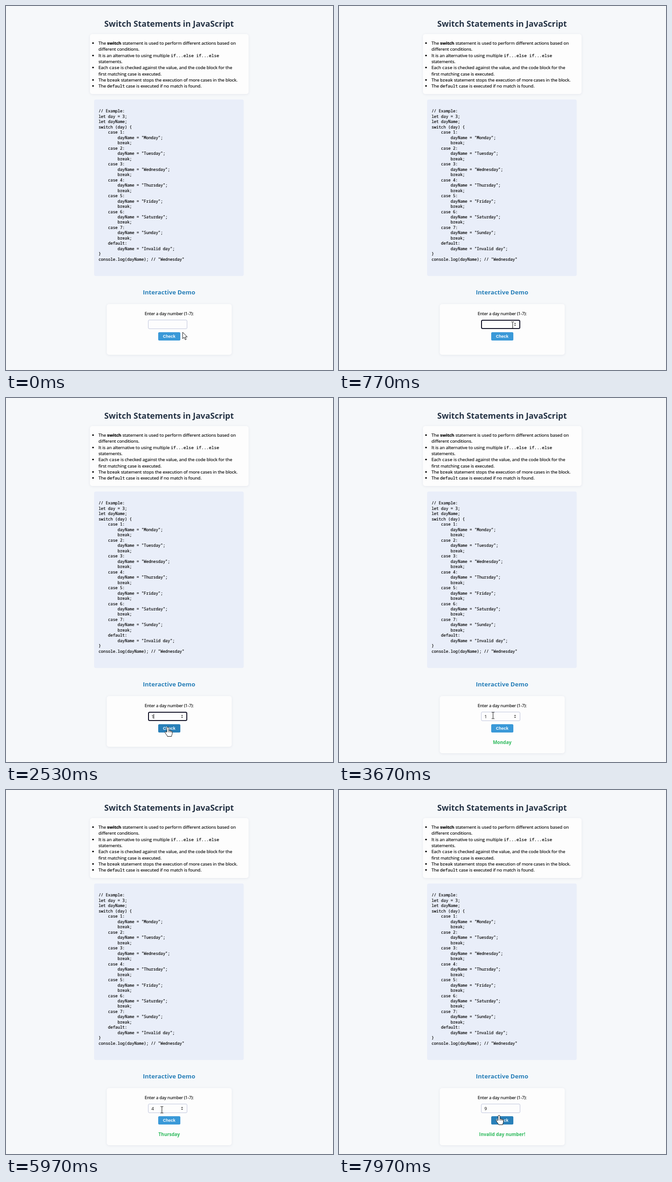
These frames come from a looping animation (709x790 px, 8000 ms). An HTML page:

```html
<!DOCTYPE html>
<html lang="en">
<head>
<meta charset="utf-8">
<title>Switch statements</title>
<style>
  html, body { margin: 0; width: 100%; height: 100%; overflow: hidden; background: #f6f8fa; }
  svg { display: block; width: 709px; height: 790px; }
  text { font-family: "Open Sans", "Noto Sans", sans-serif; white-space: pre; fill: #000; }
  .mid { text-anchor: middle; }
  .bold { font-weight: 700; }
  .mono { font-family: "Noto Sans Mono", "DejaVu Sans Mono", monospace; }
  .ui { font-family: "Liberation Sans", Arial, sans-serif; }
  #list text, #code text, #label { stroke: #000; stroke-width: .18px; }
  #list text { font-size: 9.45px; }
  #list .mono { font-size: 9.2px; }
  #code text { font-size: 8.62px; }
  .card { fill: #fdfdfd; filter: drop-shadow(0 1px 2.5px rgba(40, 60, 100, .09)); }
</style>
</head>
<body>
<svg viewBox="0 0 709 790">
  <text class="mid bold" x="353.5" y="45" style="font-size:17.75px;fill:#253345">Switch Statements in JavaScript</text>
  <rect class="card" x="182" y="61" width="344" height="130" rx="5"/>
  <g id="list"></g>

  <rect x="191" y="203" width="324.5" height="383" rx="4" fill="#e9eef9"/>
  <g id="code"></g>

  <text class="mid bold" x="353.5" y="626" style="font-size:13.15px;fill:#2980b9">Interactive Demo</text>
  <rect id="panel" class="card" x="218.5" y="647" width="271" height="110" rx="5"/>
  <text id="label" class="mid" x="353.8" y="671" style="font-size:8.97px">Enter a day number (1-7):</text>

  <rect id="field" fill="#fdfdfd"/>
  <text id="value" x="315.2" y="694.6" style="font-size:9.6px"></text>
  <path id="caret" stroke="#000" d="M0 686v10"/>
  <path id="spinner" fill="#444" d="M379.5 690l2.2-2.6 2.2 2.6zM379.5 692l2.2 2.6 2.2-2.6z"/>

  <rect id="button" x="330" y="708" width="48" height="18" rx="2.5"/>
  <text class="ui mid bold" x="353.7" y="720" style="font-size:9px;fill:#fff">Check</text>
  <text id="result" class="mid bold" x="353.8" y="751" style="font-size:10px;fill:#2dba5c"></text>

  <g id="pointer" stroke-linejoin="round">
    <path id="arrow" fill="#fff" stroke="#111" d="M0 0V14l3.2-3 2.4 5.4 2.2-1-2.3-5.2H10Z"/>
    <path id="beam" fill="none" stroke="#111" d="M-3-7h2.2l.8.6.8-.6H3M0-6.4V6.4M-3 7h2.2l.8-.6.8.6H3"/>
    <g id="hand" fill="#fff" stroke="#111">
      <path d="M-2 9V0a2 2 0 0 1 4 0v6a1.6 1.6 0 0 1 3 .5 1.5 1.5 0 0 1 2.5.7 1.3 1.3 0 0 1 2 1.2v4c0 2-1.5 3-1.5 6H-1c0-2-3-4-5-8.5-.8-2 1.5-2.5 2.5-1Z"/>
      <path d="M2 6v3.5M5 6.5v3M7.5 7.5v2"/>
    </g>
  </g>
</svg>
<script>
const $ = id => document.getElementById(id);
const mono = s => `<tspan class="mono">${s}</tspan>`;

// A leading "*" marks a line that starts a bullet.
$('list').innerHTML = [
  '*The <tspan class="bold">switch</tspan> statement is used to perform different actions based on',
  'different conditions.',
  `*It is an alternative to using multiple ${mono('if...else if...else')}`,
  'statements.',
  `*Each ${mono('case')} is checked against the value, and the code block for the`,
  'first matching case is executed.',
  `*The ${mono('break')} statement stops the execution of more cases in the block.`,
  `*The ${mono('default')} case is executed if no match is found.`
].map((line, i) => {
  const y = 84 + Math.round(i * 13.3);
  const dot = line[0] === '*' ? `<circle cx="188.7" cy="${y - 3.5}" r="1.8"/>` : '';
  return `${dot}<text x="200.5" y="${y}">${line.replace('*', '')}</text>`;
}).join('');

const days = ['Monday', 'Tuesday', 'Wednesday', 'Thursday', 'Friday', 'Saturday', 'Sunday'];
const assign = name => `        dayName = "${name}";`;
$('code').innerHTML = [
  '// Example:', 'let day = 3;', 'let dayName;', 'switch (day) {',
  ...days.flatMap((day, i) => [`    case ${i + 1}:`, assign(day), '        break;']),
  '    default:', assign('Invalid day'), '}', 'console.log(dayName); // "Wednesday"'
].map((line, i) => `<text class="mono" x="200.7" y="${231.4 + i * 11.48}">${line}</text>`).join('');

// Pointer path: time, x, y
const path = [
  [0, 383, 708], [30, 383, 708], [200, 377, 692], [1530, 376, 693], [2000, 376, 692],
  [2600, 350, 717], [3300, 348, 717], [3600, 334, 689], [3670, 334, 689],
  [3900, 336, 691], [4500, 338, 692], [4900, 342, 725], [5150, 343, 718],
  [5450, 343, 718], [5900, 338, 694], [7030, 340, 695], [7250, 340, 695],
  [7550, 347, 710], [8000, 347, 708]
];
// Step values: time, value
const typed = [[0, ''], [1400, '1'], [4100, ''], [4300, '4'], [6250, ''], [6430, '9']];
const focus = [[0, false], [260, true], [3200, false], [3850, true], [5100, false], [6080, true], [7650, false]];
const results = [[0, ''], [3200, 'Monday'], [5100, 'Thursday'], [7650, 'Invalid day number!']];

const current = (steps, t) => steps.filter(s => s[0] <= t).pop();
const show = (id, on) => $(id).setAttribute('visibility', on ? 'visible' : 'hidden');
const set = (id, attrs) => Object.entries(attrs).forEach(([k, v]) => $(id).setAttribute(k, v));

function pointerAt(t) {
  const i = path.findIndex(p => p[0] > t);
  const [t0, x0, y0] = path[i - 1], [t1, x1, y1] = path[i];
  const u = (t - t0) / (t1 - t0), k = u * u * (3 - 2 * u);
  return [x0 + (x1 - x0) * k, y0 + (y1 - y0) * k];
}

function draw(t) {
  const [x, y] = pointerAt(t);
  const overField = x > 308 && x < 393 && y > 681 && y < 701;
  const overButton = x >= 330 && x <= 378 && y >= 708 && y <= 726;
  const [focusTime, focused] = current(focus, t);
  const [typeTime, value] = current(typed, t);
  const result = current(results, t)[1];

  set('field', focused
    ? { x: 309, y: 682, width: 83, height: 18, rx: 2.5, stroke: '#111126', 'stroke-width': 2 }
    : { x: 308.5, y: 681.5, width: 84, height: 19, rx: 2.5, stroke: '#bfc5dd', 'stroke-width': 1 });
  $('value').textContent = value;
  set('caret', { transform: `translate(${value ? 320.5 : 316.5})` });
  show('caret', focused && (t - Math.max(focusTime, typeTime)) % 1000 < 500);
  show('spinner', focused || overField);
  set('button', { fill: overButton ? '#2980b9' : '#3a99d8' });
  $('result').textContent = result;
  set('panel', { height: result ? 124 : 110 });

  set('pointer', { transform: `translate(${x} ${y})` });
  show('beam', overField);
  show('hand', overButton);
  show('arrow', !overField && !overButton);
}

function tick() {
  draw(performance.now() % 8000);
  requestAnimationFrame(tick);
}
tick();
</script>
</body>
</html>
```
